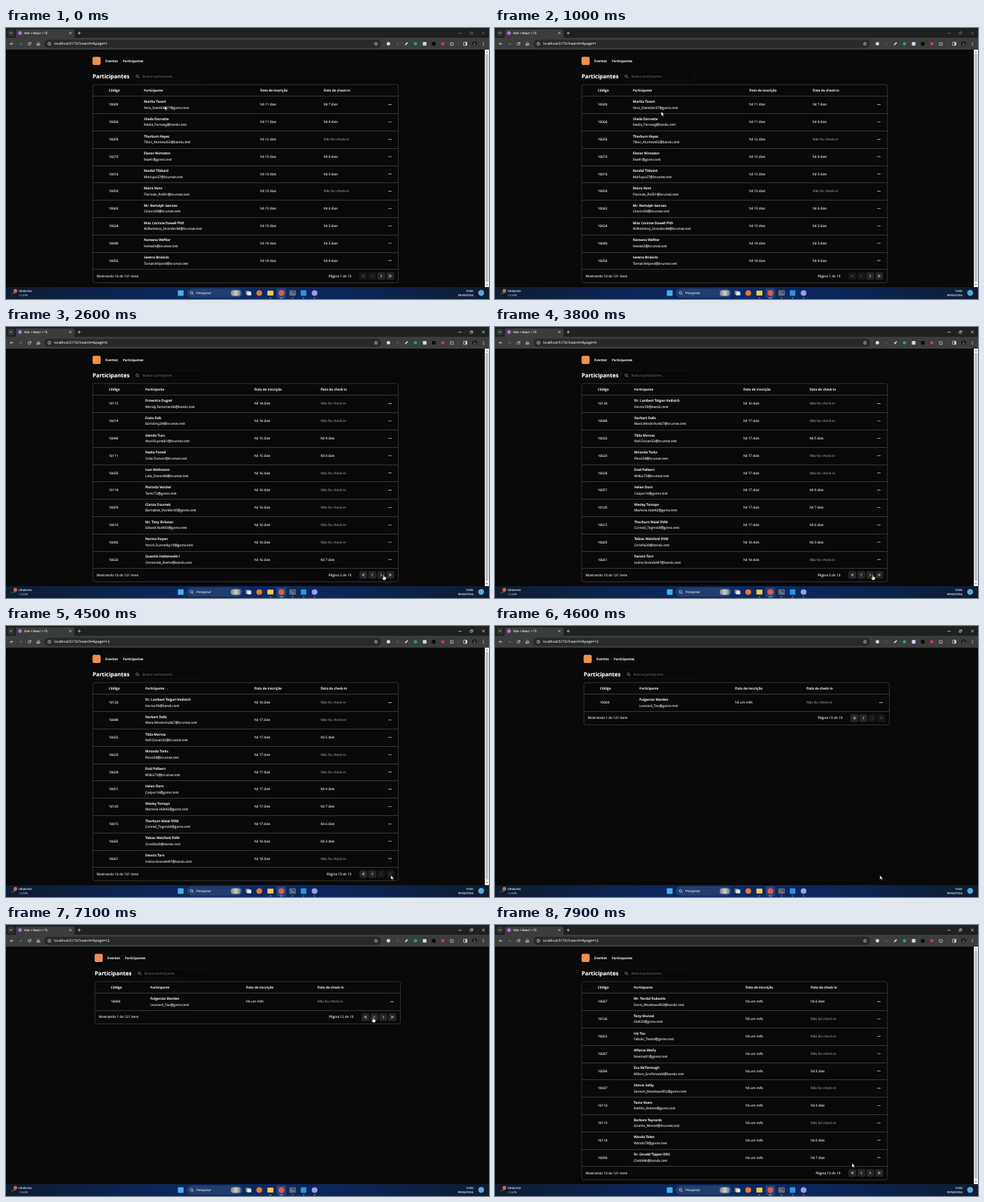
An HTML page with a canvas for the animation above (8 s loop, 690 px wide and 388 px high).

```html
<!DOCTYPE html>
<html lang="pt-BR">
<head>
<meta charset="utf-8">
<title>Participantes</title>
<style>
html, body { margin: 0; width: 100%; height: 100%; overflow: hidden; background: #080908; }
canvas { display: block; width: 690px; height: 388px; }
</style>
</head>
<body>
<canvas id="stage"></canvas>
<script>
const W = 690, H = 388, LOOP = 8000, STEP = 100;
const canvas = document.getElementById('stage');
const ctx = canvas.getContext('2d');
const dpr = window.devicePixelRatio || 1;
canvas.width = W * dpr;
canvas.height = H * dpr;

const FONT = '"Open Sans", "Noto Sans", sans-serif';
const LINE = '#383a3a', TEXT = '#e6e7e8', WHITE = '#fff', MUTED = '#8f9193';
const DOMAINS = { g: 'gomo.test', y: 'bandu.test', h: 'brumas.test' };

// code | name | mailbox | domain | days since sign-up (m = a month) | days since check-in
const parse = s => s.trim().split('\n').map(l => l.split('|'));
const PAGES = {
  1: { cols: [197, 363.3, 453.8], rows: parse(`
10009|Marilia Tovert|Vera_Stambler37|g|11|7
10006|Sheila Dorvotte|Nadia_Fernwig|y|11|4
10058|Thorburn Keyes|Tibor_Alumeva52|y|12|
10073|Elanor Wimsdon|Ilsa41|g|13|8
10016|Kendal Tibbard|Marlupo27|h|13|3
10050|Moira Venn|Florindo_Pell31|h|13|
10063|Mr. Bertolph Gannes|Clovice58|h|13|6
10024|Miss Corinne Dowell PhD|Wilhelmina_Strander84|h|13|3
10040|Noreena Weftler|Hetta63|h|14|3
10056|Serena Brielvitz|Tomas.Velpind|h|14|4`) },
  2: { cols: [199, 354.8, 449.4], rows: parse(`
10115|Ermentra Dugrel|Wendy.Tamorian36|y|14|
10014|Enzio Falk|Bartolmy29|h|14|
10046|Glenda Tuss|Abel.Rupnal61|h|15|4
10111|Nadia Pomel|Celia.Trancer|h|15|8
10033|Ivan Weltmann|Lola_Drann48|h|16|
10118|Florinda Veichel|Tamir72|g|16|
10059|Clarisa Daumek|Barnabas_Voelder35|g|16|
10010|Mr. Tony Birlason|Edvard.Nohl83|g|16|
10042|Norma Doyen|Yorick.Dunnelby18|g|16|
10026|Quentin Hatterwold I|Clementia_Brehn|y|16|7`) },
  3: { cols: [199, 354.8, 449.4], rows: parse(`
10120|Dr. Lambert Tolgan-Vodisich|Hector59|y|16|
10048|Norbert Dells|Mara.Winderholt67|h|17|
10032|Tilda Morvas|Nell.Dovan32|h|17|5
10023|Miranda Torks|Piero54|h|17|
10028|Enid Polkern|Wilkie73|h|17|
10051|Helen Dorn|Casper16|g|17|9
10105|Wesley Tamayn|Marlena.Holt42|g|17|7
10015|Thorburn Weiel DVM|Conrad_Tegmold|g|17|6
10065|Tobias Wolsford DVM|Ornella28|y|18|3
10061|Dennis Tarn|Indira.Strandel47|y|18|`) },
  12: { cols: [198.2, 358, 451], rows: parse(`
10067|Mr. Tendal Rubavitz|Doris_Meadowell63|y|m|6
10106|Tony Munsel|Olaf25|g|m|
10052|Iris Tau|Fabian_Tessol|g|m|
10087|Alfonso Merly|Noema81|g|m|
10096|Eva McTarrough|Milton_Greifenwald|y|m|3
10007|Otavio Selby|Simeon_Meadowell52|g|m|
10110|Tania Voem|Kathlin_Brakes|g|m|3
10113|Barbara Teynards|Ginette_Mossel|h|m|
10114|Wanda Tolen|Wanda78|g|m|6
10098|Dr. Osvald Tippen DDS|Clotild46|y|m|7`) },
  13: { cols: [203.3, 340, 442], rows: parse(`
10068|Fulgencio Marden|Leonard_Tau|g|m|`) }
};

// The page number changes on click, the rows follow once loaded.
const CLICKS = [[0, 1], [2200, 2], [3600, 3], [4500, 13], [7100, 12]];
const LOADS = [[0, 1], [2400, 2], [3800, 3], [4600, 13], [7200, 12]];
const PATH = [
  [0, 226.5, 111.4], [900, 226.5, 111.4], [1800, 541.4, 357.6], [1900, 540.8, 355.9],
  [2000, 539.4, 354.8], [3800, 539.4, 354.8], [4200, 549.8, 357], [5300, 549.8, 357],
  [6100, 515, 132.2], [6500, 515, 132.2], [6900, 524.3, 132.2], [7500, 524.3, 132.2],
  [7900, 510, 341], [8000, 510, 341]
];

const at = (list, t) => list.filter(e => e[0] <= t).pop()[1];

function pointer(t) {
  const i = PATH.findIndex((p, k) => k > 0 && t <= p[0]);
  const [t0, x0, y0] = PATH[i - 1], [t1, x1, y1] = PATH[i];
  const k = (t - t0) / (t1 - t0), e = k * k * (3 - 2 * k);
  return [x0 + (x1 - x0) * e, y0 + (y1 - y0) * e];
}

// y is the middle of the line; a hairline stroke keeps tiny letters solid
function text(s, x, y, size = 4.78, color = TEXT, weight = 400, align = 'left') {
  ctx.save();
  ctx.translate(x, y + size * 0.355);
  ctx.scale(0.1, 0.1);
  ctx.font = `${weight} ${size * 10}px ${FONT}`;
  ctx.textAlign = align;
  ctx.fillStyle = ctx.strokeStyle = color;
  ctx.lineWidth = 1.1;
  ctx.lineJoin = 'round';
  ctx.fillText(s, 0, 0);
  ctx.strokeText(s, 0, 0);
  ctx.restore();
}

function rect(x, y, w, h, fill, r = 0, stroke, lw = 0.5) {
  ctx.beginPath();
  ctx.roundRect(x, y, w, h, r);
  if (fill) { ctx.fillStyle = fill; ctx.fill(); }
  if (stroke) { ctx.strokeStyle = stroke; ctx.lineWidth = lw; ctx.stroke(); }
}

function dot(x, y, r, fill, stroke, lw = 0.6) {
  ctx.beginPath();
  ctx.arc(x, y, r, 0, 7);
  if (fill) { ctx.fillStyle = fill; ctx.fill(); }
  if (stroke) { ctx.strokeStyle = stroke; ctx.lineWidth = lw; ctx.stroke(); }
}

// SVG path data placed at x, y
function path(d, x, y, stroke, lw = 0.7, fill) {
  const p = new Path2D(d);
  ctx.save();
  ctx.translate(x, y);
  ctx.lineCap = ctx.lineJoin = 'round';
  if (fill) { ctx.fillStyle = fill; ctx.fill(p); }
  if (stroke) { ctx.strokeStyle = stroke; ctx.lineWidth = lw; ctx.stroke(p); }
  ctx.restore();
}

// horizontal gradient from evenly spaced colours
function fade(x0, x1, ...colors) {
  const g = ctx.createLinearGradient(x0, 0, x1, 0);
  colors.forEach((c, i) => g.addColorStop(i / (colors.length - 1), c));
  return g;
}

function lens(x, y, color) {
  dot(x - 0.4, y - 0.4, 1.8, null, color, 0.7);
  path('M1 1L2.5 2.5', x, y, color, 0.7);
}

function browser(page, active) {
  const ink = '#e2e2e2', dim = active ? '#e6e6e6' : '#737373';
  rect(0, 0, W, 15, '#1f2020');
  rect(2.5, 2.8, 9, 9, '#343535', 2.5);
  path('M-1.4 -.6L0 .8L1.4 -.6', 7, 7.2, ink);
  rect(14, 2, 84, 14, '#3b3c3c', [3, 3, 0, 0]);
  dot(20, 7.2, 2.6, '#b273d6');
  text('Vite + React + TS', 26, 7.3, 4.4, '#e3e3e3');
  path('M-1.3 -1.3L1.3 1.3M1.3 -1.3L-1.3 1.3', 92, 7.3, ink, 0.7);
  path('M-1.8 0H1.8M0 -1.8V1.8', 104.6, 7.3, ink, 0.7);
  path('M-1.8 0H1.8', 648.6, 7.4, dim, 0.7);
  path('M-1.7 -.8H.9V1.8H-1.7ZM-.8 -1.7H1.8V.9', 665, 7.2, dim, 0.6);
  path('M-1.7 -1.7L1.7 1.7M1.7 -1.7L-1.7 1.7', 682, 7.2, dim, 0.7);

  rect(0, 14, W, 17, '#3b3c3c');
  path('M2 0H-2M-.2 -1.8L-2 0L-.2 1.8', 8.2, 22.6, ink);
  path('M-2 0H2M.2 -1.8L2 0L.2 1.8', 20.7, 22.6, '#747575');
  path('M1.9 -.6A2 2 0 1 0 1.8 1M2.1 -2V-.5H.6', 33.5, 22.6, ink);
  path('M-1.9 2.1V-.5L0 -2.1L1.9 -.5V2.1H.6V.4H-.6V2.1Z', 46.3, 22.5, ink);
  rect(54.5, 16.8, 481.5, 11.6, '#282929', 5.8);
  dot(62, 22.6, 2.2, null, ink);
  path('M0 -.3V1.1M0 -1.2V-1.1', 62, 22.6, ink, 0.6);
  text('localhost:5173/?search=&page=' + page, 69, 22.6, 4.95, '#e6e6e6');
  path('M0 -2.3L.7 -.7L2.4 -.6L1.1 .5L1.5 2.2L0 1.3L-1.5 2.2L-1.1 .5L-2.4 -.6L-.7 -.7Z', 528.5, 22.6, ink, 0.6);
  dot(546.3, 22.6, 2.5, '#d8dadb');
  dot(559.3, 22.6, 2.1, '#4a4b4c');
  path('M-2.2 2.2L-1.6 .4L1.2 -2.3L2.3 -1.2L-.5 1.6Z', 572, 22.6, null, 0, '#d4e3ee');
  dot(585, 22.6, 2.4, '#25a56c');
  rect(595.5, 20, 5.2, 5.2, '#c9d5f2', 1);
  rect(608.5, 20, 5.2, 5.2, '#0c0c0d', 0.8);
  dot(624, 22.6, 2.4, '#d9374a');
  path('M-2 -1.3H-.7A.8 .8 0 0 1 .8 -1.3H1.8V0A.8 .8 0 0 1 1.8 1.2V2.3H-2V1.2A.7 .7 0 0 0 -2 0Z', 637, 22.4, ink);
  rect(646, 19.5, 0.5, 6, '#5d5e5e');
  rect(653.6, 20.3, 4.8, 4.6, null, 0.6, ink, 0.7);
  rect(656.4, 20.3, 2, 4.6, ink);
  dot(669.5, 22.6, 3.3, '#1a1515');
  dot(669.5, 21.8, 1.1, '#7b5948');
  rect(667.7, 23.2, 3.6, 1.8, '#7b5948', [1.5, 1.5, 0.6, 0.6]);
  for (const d of [-1.8, 0, 1.8]) dot(682, 22.6 + d, 0.6, ink);
}

function scrollbar() {
  rect(684, 31, 6, 340, '#f1f1f1');
  rect(685, 37, 4, 326, '#c1c1c1');
  path('M-1.4 .8L0 -.8L1.4 .8Z', 687, 34, null, 0, '#505050');
  path('M-1.4 -.8L0 .8L1.4 -.8Z', 687, 367.5, null, 0, '#505050');
}

const CHEVRONS = ['M0 -1.5L-1.5 0L0 1.5M1.7 -1.5L.2 0L1.7 1.5', 'M.7 -1.5L-.8 0L.7 1.5',
  'M-.7 -1.5L.8 0L-.7 1.5', 'M0 -1.5L1.5 0L0 1.5M-1.7 -1.5L-.2 0L-1.7 1.5'];

function layout(page, loaded) {
  const rows = PAGES[loaded].rows.length;
  const dx = rows < 10 ? 3 : 0, foot = 97.3 + 24.8 * rows;
  const buttons = CHEVRONS.map((d, i) => ({
    d, x: 510.4 + 12.85 * i + dx, y: foot + 9.7, on: i < 2 ? page > 1 : page < 13
  }));
  return { dx, foot, buttons };
}

const box = y => rect(129.9, y - 2.8, 5.6, 5.6, '#060707', 1, '#161818');
const since = d => d === 'm' ? 'há um mês' : `há ${d} dias`;
const rule = y => rect(124, Math.round(y), 436.4, 1, LINE);

function app(page, loaded, { dx, foot, buttons }) {
  const { cols: [cName, cDate, cCheck], rows } = PAGES[loaded];
  rect(0, 31, W, 340, '#080908');
  if (!dx) scrollbar();
  ctx.save();
  ctx.translate(dx, 0);
  rect(123.6, 41.3, 11.6, 11.6, '#f08f4f', 2.2);
  text('Eventos', 142, 47.2, 4.72, WHITE, 600);
  text('Participantes', 167, 47.2, 4.6, WHITE, 600);
  text('Participantes', 123.7, 69.6, 7.9, WHITE, 700);
  rect(180.8, 63, 103.4, 12.2, '#070808', 2.5, '#181a1a');
  lens(187.8, 69.3, '#83ad9f');
  text('Buscar participante...', 195, 69.2, 4.65, '#646668');

  rect(124, 81, 436.4, foot + 19.5 - 81, null, 3, LINE, 0.9);
  box(89.2);
  text('Código', 146.8, 89.2, 4.78, WHITE, 600);
  text('Participante', cName, 89.2, 4.6, WHITE, 600);
  text('Data de inscrição', cDate, 89.2, 4.7, WHITE, 600);
  text('Data do check-in', cCheck, 89.2, 4.7, WHITE, 600);

  rows.forEach(([code, name, user, dom, days, check], i) => {
    const top = 97.3 + 24.8 * i, y = top + 12.4;
    rule(top);
    box(y);
    text(code, 146.8, y);
    text(name, cName, y - 4.4, 4.78, WHITE, 600);
    text(user + '@' + DOMAINS[dom], cName, y + 4.2);
    text(since(days), cDate, y);
    if (check) text(since(check), cCheck, y);
    else text('Não fez check-in', cCheck, y, 4.78, MUTED);
    rect(543, y - 5.6, 11, 11.2, '#060707', 2, '#161818');
    for (const d of [-1.7, 0, 1.7]) dot(548.4 + d, y, 0.6, WHITE);
  });

  rule(foot);
  text(`Mostrando ${rows.length} de 121 itens`, 129.6, foot + 9.7);
  text(`Página ${page} de 13`, 493.4, foot + 9.7, 4.78, TEXT, 400, 'right');
  ctx.restore();

  for (const b of buttons) {
    rect(b.x - 5.6, b.y - 5.6, 11.2, 11.2, b.on ? '#242626' : '#171818', 2);
    path(b.d, b.x, b.y, b.on ? '#f4f4f4' : '#5b5d5e', 0.75);
  }
}

function taskbar() {
  rect(0, 371, W, 17, fade(0, W, '#0e1c30', '#0b2452', '#0a2b68', '#0b2452', '#0e1c30'));
  path('M-3.5 2.5L-1 0L1 1.2L3.5 -2.2', 11.5, 379, '#3fae68', 0.9);
  dot(13.4, 376.2, 2.6, '#d9604c');
  text('ORVALINA', 18, 376.8, 3.9, '#eceef2');
  text('+1,63%', 18, 382.3, 3.9, '#b6bfcc');

  rect(245.5, 375.4, 8.2, 8.2, '#43b1ea', 0.6);
  rect(258.6, 373.6, 79, 11.8, '#213d6e', 5.9, '#37507c');
  lens(265.4, 379.5, '#e6e9ee');
  text('Pesquisar', 272, 379.6, 4.65, '#dfe4ec');
  rect(321, 375.6, 14.5, 7.8, fade(321, 336, '#6b82a8', '#d9cfae', '#54739b'), 3.5);

  rect(342.3, 376, 6, 6, '#77808c', 0.6);
  rect(344.4, 377.4, 6, 5.4, '#e3e6ea', 0.6);
  dot(361.8, 379.5, 4.1, '#ee7632');
  rect(373.4, 376, 8.6, 7, '#f3c74c', 0.8);
  rect(386.8, 372.8, 13.4, 13.4, '#26437a', 1.5);
  dot(393.5, 379.5, 4.2, '#dd5b45');
  rect(405.2, 376, 8.4, 7, '#4b5158', 0.8, '#aeb3b8');
  path('M-2.4 -1.4L-1 0L-2.4 1.4M0 1.5H2', 409.4, 379.5, '#f0f0f0', 0.6);
  rect(421.1, 375.5, 8, 8, '#2b93de', 1);
  dot(440.8, 379.5, 4.1, '#9d9be6');
  for (const x of [377.7, 409.4, 425.1, 440.8]) rect(x - 1.2, 386.1, 2.4, 0.9, '#929ba8', 0.4);
  rect(390.6, 386.1, 5.8, 0.9, '#64b7ef', 0.4);

  text('10:06', 667.5, 376.8, 4.1, '#eceef2', 400, 'right');
  text('09/04/2024', 667.5, 382.3, 4.1, '#eceef2', 400, 'right');
  dot(678.8, 379.3, 4.2, '#55a8d9');
}

const ARROW = 'M0 0V6.1L1.5 4.8L2.5 7L3.5 6.5L2.5 4.4H4.4Z';
const HAND = 'M-.6 .5Q0 -.4 .6 .5V2.7Q1.3 2.3 1.7 2.9Q2.4 2.6 2.8 3.2Q3.6 3 3.7 3.9V5.4L3 7.4H-.5L-2.1 4.8Q-2.2 3.8 -1.2 4.2L-.6 4.8Z';

function cursor(x, y, hand) {
  path(hand ? HAND : ARROW, x, y, '#111', 0.5, '#fff');
}

function draw(now) {
  const t = Math.floor(now % LOOP / STEP) * STEP;
  const page = at(CLICKS, t), loaded = at(LOADS, t);
  const view = layout(page, loaded);
  const [x, y] = pointer(t);
  const hand = view.buttons.some(b => b.on && Math.abs(x - b.x) < 5.7 && Math.abs(y - b.y) < 5.7);
  ctx.setTransform(dpr, 0, 0, dpr, 0, 0);
  ctx.textRendering = 'geometricPrecision';
  app(page, loaded, view);
  browser(page, t >= 2200);
  taskbar();
  cursor(x, y, hand);
}

const start = performance.now();
function tick() {
  draw(performance.now() - start);
  requestAnimationFrame(tick);
}
tick();
</script>
</body>
</html>
```
